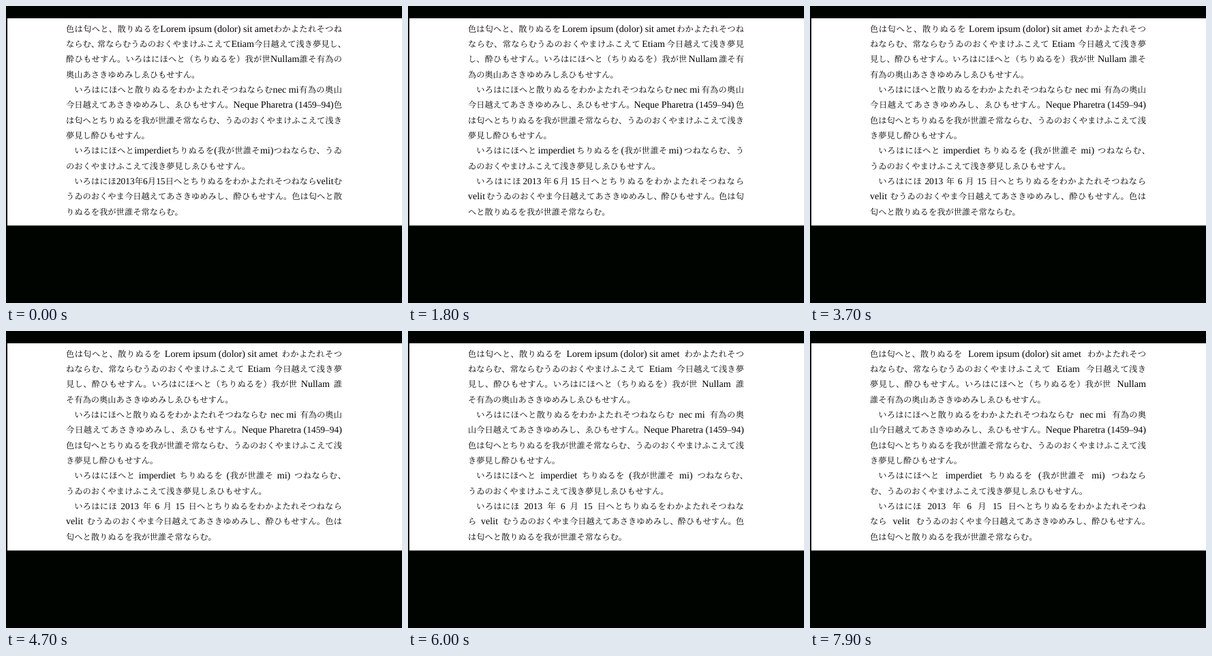
An HTML page that plays this animation: 581 px wide and 435 px high, repeating every 8000 ms.

```html
<!DOCTYPE html>
<html lang="ja">
<head>
<meta charset="utf-8">
<title>和欧間のアキ</title>
<style>
  html, body { margin: 0; width: 100%; height: 100%; overflow: hidden; background: #000400; }
  svg { display: block; width: 581px; height: 435px; }
  text {
    font: 300 12.27px "Noto Serif CJK JP", "Noto Sans CJK JP", "Noto Sans CJK", serif;
    text-rendering: geometricPrecision;
    white-space: pre;
  }
  .latin { font: 14.1px "Liberation Serif", serif; }
  .digits { font-size: 13.4px; }
</style>
</head>
<body>
<svg viewBox="0 0 581 435">
  <rect x="2" y="18" width="579" height="303.5" fill="#fff"/>
  <g id="page"></g>
</svg>
<script>
const EM = 12.27, MEASURE = 33 * EM, LEFT = 88, BASELINE = 37.8, LEADING = 22.33;
const LATIN_SIZE = 14.1, DIGIT_SIZE = 13.4;
const GAP_STEP = 0.113, STEP_MS = 100, LOOP_MS = 8000;

const paragraphs = [
  '色は匂へと、散りぬるをLorem ipsum (dolor) sit ametわかよたれそつねならむ、常ならむうゐのおくやまけふこえてEtiam今日越えて浅き夢見し、酔ひもせすん。いろはにほへと（ちりぬるを）我が世Nullam誰そ有為の奥山あさきゆめみしゑひもせすん。',
  'いろはにほへと散りぬるをわかよたれそつねならむnec mi有為の奥山今日越えてあさきゆめみし、ゑひもせすん。Neque Pharetra (1459–94)色は匂へとちりぬるを我が世誰そ常ならむ、うゐのおくやまけふこえて浅き夢見し酔ひもせすん。',
  'いろはにほへとimperdietちりぬるを(我が世誰そmi)つねならむ、うゐのおくやまけふこえて浅き夢見しゑひもせすん。',
  'いろはにほ2013年6月15日へとちりぬるをわかよたれそつねならvelitむうゐのおくやま今日越えてあさきゆめみし、酔ひもせすん。色は匂へと散りぬるを我が世誰そ常ならむ。'
];

const isStop = s => '、。'.includes(s);
const pen = document.createElement('canvas').getContext('2d');
pen.font = '1000px "Liberation Serif", serif';

// Latin runs are measured at a large size so that hinting has no effect.
const latinWidth = s => s.split(/([\d–]+)/).reduce((sum, part, i) =>
  sum + pen.measureText(part).width / 1000 * (i % 2 ? DIGIT_SIZE : LATIN_SIZE), 0);

function tokenize(str) {
  return str.match(/[ -~–]+|./g).map(s => {
    const latin = /[ -~–]/.test(s);
    return { s, latin, stop: isStop(s), w: latin ? latinWidth(s) : EM };
  });
}

// Groups tokens that may not be separated by a line break.
function toUnits(tokens) {
  const units = [];
  tokens.forEach((token, i) => {
    const glued = '、。）'.includes(token.s) || (i && '(（'.includes(tokens[i - 1].s));
    if (glued) units[units.length - 1].push(token);
    else units.push([token]);
  });
  return units;
}

const texts = paragraphs.map(p => toUnits(tokenize(p)));

function gapBetween(a, b, gap) {
  if (!b || a.latin === b.latin || a.s === '(') return 0;
  return '、。（）'.includes((a.latin ? b : a).s) ? 0 : gap;
}

function naturalWidth(line, indent, gap) {
  const sum = line.reduce((x, t, i) => x + t.w + gapBetween(t, line[i + 1], gap), indent);
  return line[line.length - 1].stop ? sum - EM / 2 : sum;
}

function wrap(units, firstIndent, gap) {
  const lines = [];
  let line = [], indent = firstIndent;
  for (const unit of units) {
    const longer = line.concat(unit);
    const squeeze = longer.filter(t => t.stop).length > 1 ? 3.5 : 0.3;
    if (naturalWidth(longer, indent, gap) <= MEASURE + squeeze) {
      line = longer;
    } else {
      lines.push({ line, indent });
      line = unit;
      indent = 0;
    }
  }
  lines.push({ line, indent, last: true });
  return lines;
}

function lineMarkup({ line, indent, last }, gap, y) {
  const slack = last ? 0 : MEASURE - naturalWidth(line, indent, gap);
  const stretch = Math.max(slack, 0) / (line.length - 1);
  const stops = line.slice(0, -1).filter(t => t.stop).length;
  const shrink = stops ? Math.min(slack, 0) / stops : 0;
  let x = LEFT + indent;
  const spans = line.map((t, i) => {
    const body = t.latin ? t.s.replace(/[\d–]+/g, '<tspan class="digits">$&</tspan>') : t.s;
    const span = `<tspan x="${x.toFixed(2)}"${t.latin ? ' class="latin"' : ''}>${body}</tspan>`;
    x += t.w + gapBetween(t, line[i + 1], gap) + stretch + (t.stop ? shrink : 0);
    return span;
  });
  return `<text y="${y.toFixed(2)}">${spans.join('')}</text>`;
}

const page = document.getElementById('page');
let shown = -1;

function draw(now) {
  const step = Math.floor(now % LOOP_MS / STEP_MS);
  if (step !== shown) {
    shown = step;
    const gap = step * GAP_STEP;
    page.innerHTML = texts
      .flatMap((units, i) => wrap(units, i ? EM : 0, gap))
      .map((row, i) => lineMarkup(row, gap, BASELINE + i * LEADING))
      .join('');
  }
  requestAnimationFrame(draw);
}
draw(0);
</script>
</body>
</html>
```
